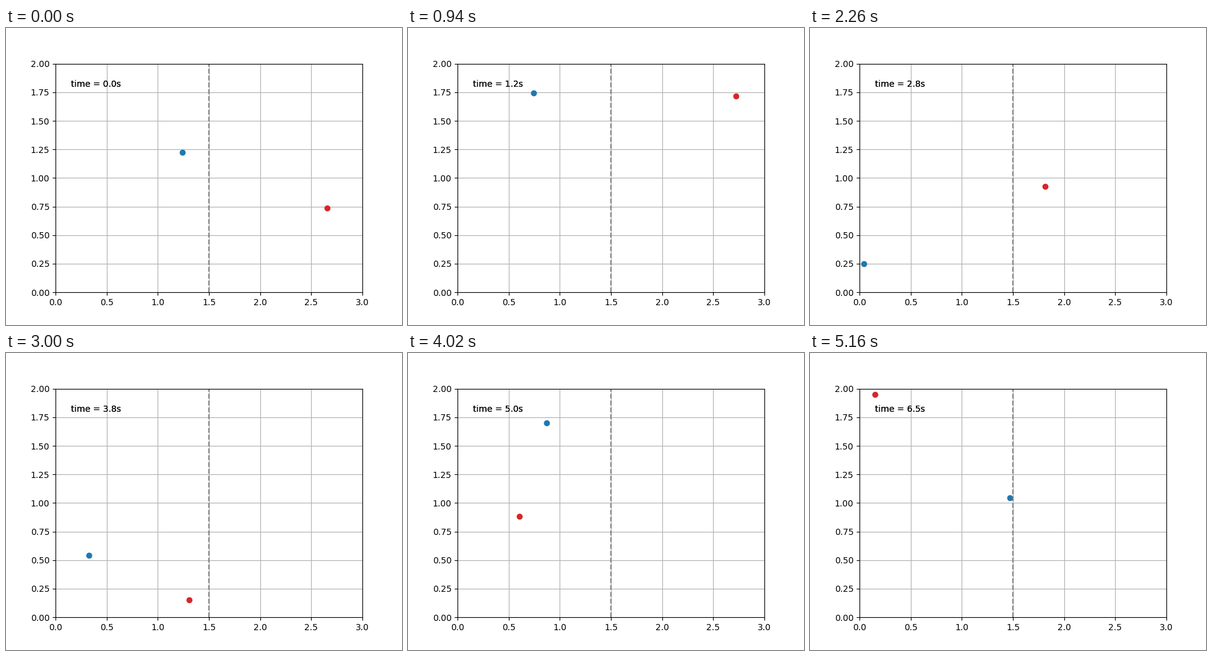
A matplotlib script for the animation above (5180 ms loop, 640 by 480 pixels).

```python
import numpy as np
import matplotlib.pyplot as plt
from matplotlib.animation import FuncAnimation

WIDTH, HEIGHT = 3.0, 2.0
FRAMES, INTERVAL = 259, 20
DT = 0.025


def bounce(start, angle):
    """Path of a unit-speed ball that turns back one step past each wall."""
    size = np.array([WIDTH, HEIGHT])
    pos = np.array(start)
    vel = np.array([np.cos(np.radians(angle)), np.sin(np.radians(angle))])
    path = [pos]
    for _ in range(FRAMES - 1):
        pos = pos + vel * DT
        vel = np.where((pos < 0) | (pos > size), -vel, vel)
        path.append(pos)
    return np.array(path)


paths = [bounce((1.2390, 1.22419), 115.05), bounce((2.65467, 0.73647), 56.638)]

fig, ax = plt.subplots(figsize=(6.4, 4.8), dpi=100)
ax.set_xlim(0, WIDTH)
ax.set_ylim(0, HEIGHT)
ax.grid()

balls = [ax.plot([], [], "o", color=c)[0] for c in ("tab:blue", "tab:red")]
ax.axvline(WIDTH / 2, ls="--", color="gray")
# Two overlaid labels give the slightly heavier text.
labels = [ax.text(0.05, 0.9, "", transform=ax.transAxes) for _ in balls]


def update(i):
    for ball, label, path in zip(balls, labels, paths):
        ball.set_data(path[i, :1], path[i, 1:])
        label.set_text(f"time = {i * DT:.1f}s")
    return balls + labels


anim = FuncAnimation(fig, update, frames=FRAMES, interval=INTERVAL,
                     init_func=lambda: update(0), repeat=True, repeat_delay=0)
plt.show()
```
